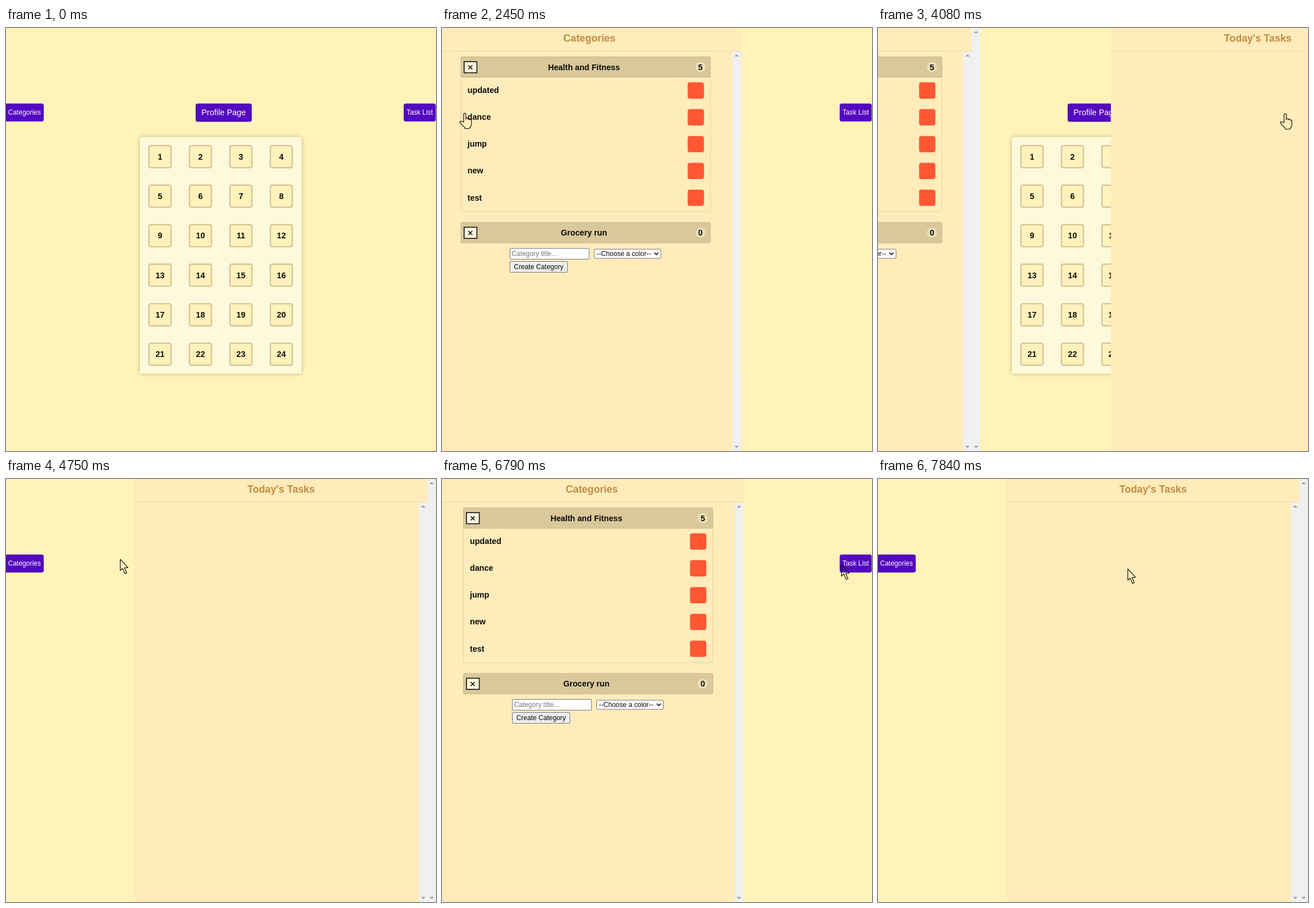
Animation, 755 px wide and 742 px high, one loop 8 s. Source, as an HTML page:

```html
<!DOCTYPE html>
<html lang="en">
<head>
<meta charset="utf-8">
<title>Planner panels</title>
<style>
  html, body { margin: 0; width: 100%; height: 100%; overflow: hidden; background: #fff3ba; }
  svg { display: block; width: 100%; height: 100%; font-family: "Liberation Sans", Arial, sans-serif; }
  .sheet { filter: drop-shadow(0 0 3.5px rgba(60, 50, 0, .32)); }
</style>
</head>
<body>
<svg id="stage" viewBox="0 0 755 742"></svg>
<script>
const NS = 'http://www.w3.org/2000/svg';
const LOOP = 8000, SLIDE = 300, STEP = 94;
const WIDTH = 529, LEFT_TRAVEL = 535, RIGHT_TRAVEL = 530;
const stage = document.getElementById('stage');

function add(parent, tag, attrs = {}) {
  const node = document.createElementNS(NS, tag);
  for (const key in attrs) node.setAttribute(key, attrs[key]);
  parent.appendChild(node);
  return node;
}
const group = parent => add(parent, 'g');
const rect = (parent, x, y, width, height, fill, more) =>
  add(parent, 'rect', { x, y, width, height, fill, ...more });
const path = (parent, d, more) => add(parent, 'path', { d, ...more });
function text(parent, str, x, y, size, more) {
  add(parent, 'text', { x, y, 'font-size': size, fill: '#0b0b0b', ...more }).textContent = str;
}
const bold = { 'font-weight': 700 };
const mid = { 'text-anchor': 'middle' };
const boldMid = { ...bold, ...mid };

function scrollbar(parent, x, top) {
  rect(parent, x, top, 15, 742 - top, '#f0f0f0');
  path(parent, `M${x + 3.5} ${top + 9}l4 -4l4 4zM${x + 3.5} 733l4 4l4 -4z`, { fill: '#a3a3a3' });
}

function panelHead(parent, title, x, width) {
  rect(parent, 0, 0, WIDTH + 1, 742, '#ffecba');
  text(parent, title, x, 24, 17.7, { ...boldMid, fill: '#c08b41' });
  rect(parent, 0, 40, width, 1, '#ead7a8');
}

function navButton(x, y, w, h, label, size, more) {
  const g = group(stage);
  rect(g, x, y, w, h, '#5408bf', { rx: 3.5, ...more });
  text(g, label, x < 0 ? 32.4 : x + w / 2, 148 + size * .34, size, { ...mid, fill: '#fff' });
  return g;
}

function calendar() {
  rect(stage, 235, 191, 284, 415.5, '#fff9dc', { rx: 3, class: 'sheet' });
  for (let i = 0; i < 24; i++) {
    const x = 270.4 + (i % 4) * 71, y = 225.7 + Math.floor(i / 4) * 69.3;
    rect(stage, x - 19.3, y - 19.3, 38.6, 38.6, '#fff2bb', { rx: 3, stroke: '#d1c799', 'stroke-width': 2.4 });
    text(stage, i + 1, x, y + 5, 14.2, boldMid);
  }
}

function cardHead(g, left, width, y, title, count) {
  const right = left + width, c = y + 18.5;
  rect(g, left + .5, y + .5, width - 1, 36, '#d9c899', { rx: 2, stroke: '#cbbb8c' });
  rect(g, left + 6, y + 9, 22.5, 19.5, '#fff7dc', { stroke: '#111', 'stroke-width': 1.6 });
  path(g, `M${left + 13.5} ${c - 3}l7 7m0 -7l-7 7`, { stroke: '#000', 'stroke-width': 1.5 });
  text(g, title, left + width / 2 - 3, c + 5, 14.2, boldMid);
  add(g, 'circle', { cx: right - 18, cy: c, r: 9, fill: '#ebdfb9' });
  text(g, count, right - 18, c + 5, 14.2, boldMid);
}

// inner is the width left of the list scrollbar; it shrinks beside an outer one
function categories(parent, inner) {
  const g = group(parent);
  panelHead(g, 'Categories', inner / 2 + 6, inner + 15);
  scrollbar(g, inner, 41);
  if (inner < 514) scrollbar(g, inner + 15, 0);
  const width = Math.round(inner * .854), left = inner / 2 - .5 - width / 2;
  rect(g, left + .5, 60.5, width - 1, 261.5, 'none', { rx: 2, stroke: '#e6d3a3' });
  cardHead(g, left, width, 50, 'Health and Fitness', 5);
  ['updated', 'dance', 'jump', 'new', 'test'].forEach((name, i) => {
    const y = 109.6 + i * 47.05;
    text(g, name, left + 12, y + 4.7, 14.2, bold);
    rect(g, left + width - 40.5, y - 14.3, 28.6, 28.6, '#ff5733', { rx: 4 });
  });
  cardHead(g, left, width, 340.5, 'Grocery run', 0);

  const x = inner / 2 - 134, edge = { rx: 1.5, stroke: '#777' };
  rect(g, x + .5, 386.5, 139, 19, '#fff', edge);
  text(g, 'Category title...', x + 3.5, 400, 11.85, { fill: '#777' });
  rect(g, x + 148.5, 388, 117, 16, '#fff', edge);
  text(g, '--Choose a color--', x + 152.5, 400, 11.85);
  path(g, `M${x + 254} 394l3.6 3.6l3.6 -3.6`, { fill: 'none', stroke: '#111', 'stroke-width': 1.7 });
  rect(g, x + .5, 409.5, 101, 19, '#efefef', edge);
  text(g, 'Create Category', x + 51, 423.4, 11.85, mid);
  return g;
}

function tasks() {
  const g = group(stage);
  panelHead(g, "Today's Tasks", 258, 515);
  scrollbar(g, 500, 41);
  scrollbar(g, 515, 0);
  return g;
}

const leftButton = navButton(-6, 132.5, 72.3, 31.5, 'Categories', 11.9);
navButton(333.5, 133, 97.5, 31, 'Profile Page', 14.3, { rx: 2.5, stroke: '#4405a0', 'stroke-width': 1 });
const rightButton = navButton(698.3, 132.5, 56.2, 31.5, 'Task List', 11.9);
calendar();
const leftPanel = group(stage);
const wide = categories(leftPanel, 514);
const narrow = categories(leftPanel, 499);
const rightPanel = tasks();

const pointer = group(stage);
const ink = { fill: 'none', stroke: '#000', 'stroke-width': 1.1, 'stroke-linejoin': 'round' };
const arrow = path(pointer, 'M.6 .8V20.5L4.6 16.8L9 26.2L12 24.8L8 15.7L14.2 15.4Z', ink);
const hand = path(pointer,
  'M-2 16V2.5Q-2 .6 0 .6T2 2.5V11Q2 8.7 4 9T5.6 11Q6 9.4 7.6 9.8T9 12Q9.6 10.8 10.8 11.5T11.8 13.5' +
  'V19Q11.8 22.5 9.4 25V26.6Q5 28.4 0 27.2V25.6L-8 17.6Q-9.4 15.8 -8 14.8T-5 15Z', ink);

// pointer gestures and the clicks between them
const gestures = [
  { from: 300, to: 410, x: 192, y: 330 },
  { from: 1090, to: 1190, x: 112, y: 256 },
  { from: 1530, to: 1880, x: 40, y: 149 },
  { from: 2740, to: 2830, x: 524, y: 129 },
  { from: 3120, to: 3690, x: 715, y: 150 },
  { from: 4370, to: 4750, x: 200, y: 140 },
  { from: 4930, to: 5320, x: 47, y: 161 },
  { from: 6110, to: 6490, x: 639, y: 132 },
  { from: 6680, to: 6970, x: 715, y: 154 },
  { from: 7460, to: 7840, x: 438, y: 157 }
];
const clicks = [2180, 3990, 5830, 7170];
const slideStarts = [2197, 3970, 5840, 7165];
const actionStarts = [0, ...clicks, ...gestures.map(g => g.from)];

// the screen repaints every STEP from the start of the latest action
function repaint(t) {
  const from = Math.max(...actionStarts.filter(s => s <= t));
  return from + STEP * Math.floor((t - from) / STEP + .17);
}

function pointerAt(t) {
  let p = { x: 185, y: 330 };
  for (const g of gestures) {
    if (t < g.from) break;
    const k = Math.min(1, (t - g.from + STEP) / (g.to - g.from + STEP));
    const eased = 1 - (1 - k) ** 2.5;
    p = { x: p.x + (g.x - p.x) * eased, y: p.y + (g.y - p.y) * eased };
  }
  return p;
}

// cubic-bezier(.25, .1, .25, 1)
function ease(x) {
  if (x <= 0) return 0;
  if (x >= 1) return 1;
  const curve = (u, p, q) => 3 * u * (1 - u) ** 2 * p + 3 * u * u * (1 - u) * q + u ** 3;
  let lo = 0, hi = 1;
  for (let i = 0; i < 24; i++) {
    const u = (lo + hi) / 2;
    if (curve(u, .25, .25) < x) lo = u; else hi = u;
  }
  return curve(lo, .1, 1);
}

const show = (node, on) => { node.style.display = on ? '' : 'none'; };
const move = (node, x, y = 0) => node.setAttribute('transform', `translate(${x} ${y})`);

function draw(time) {
  const t = repaint(time);
  const [first, toTasks, toCategories, back] = slideStarts.map(s => ease((t - s) / SLIDE));
  const rightOpen = toTasks - toCategories + back;
  const leftOpen = first - rightOpen;
  const closing = (toTasks > 0 && toCategories === 0) || back > 0;

  move(leftPanel, (leftOpen - 1) * LEFT_TRAVEL);
  show(wide, !closing);
  show(narrow, closing);
  move(rightPanel, 755 - rightOpen * RIGHT_TRAVEL);

  const p = pointerAt(t);
  const level = p.y > 132 && p.y < 164;
  const onLeft = level && p.x < 63, onRight = level && p.x > 703;
  move(pointer, p.x, p.y);
  show(pointer, t >= gestures[0].from);
  show(hand, onLeft || onRight);
  show(arrow, !onLeft && !onRight);
  leftButton.setAttribute('opacity', onLeft ? .75 : 1);
  rightButton.setAttribute('opacity', onRight ? .75 : 1);
}

const begun = performance.now();
function tick() {
  draw((performance.now() - begun) % LOOP);
  requestAnimationFrame(tick);
}
tick();
</script>
</body>
</html>
```
